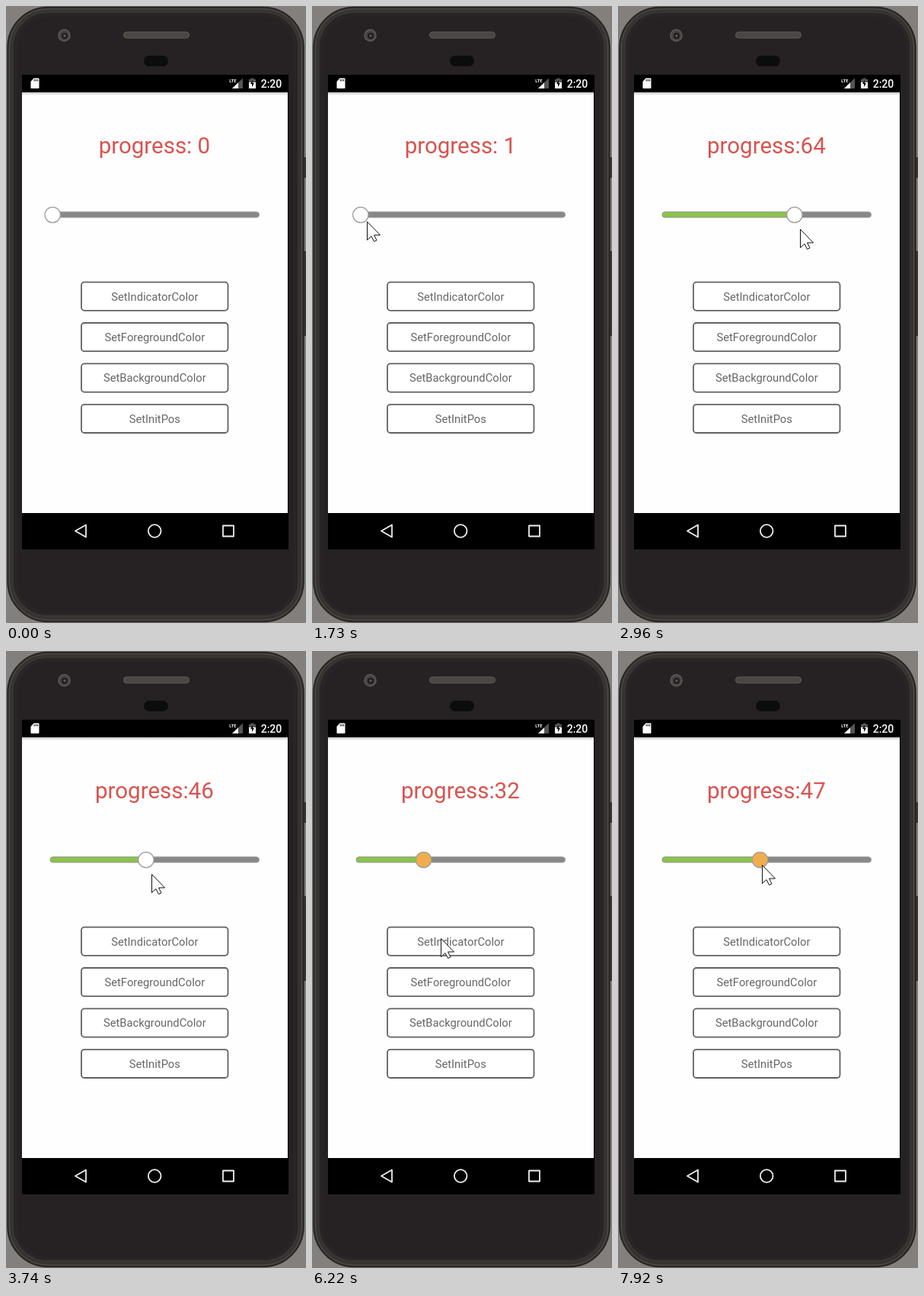
Write an HTML page that moves like this. It is 394 px wide and 808 px high and loops after 8 s.

```html
<!DOCTYPE html>
<html lang="en">
<head>
<meta charset="utf-8">
<title>Slider demo</title>
<style>
  html, body { margin: 0; width: 100%; height: 100%; overflow: hidden; background: #827f7d; }
  svg { display: block; font-family: Roboto, sans-serif; }
  .button rect { fill: #fff; stroke: #626262; stroke-width: 1.8; }
  .button text { fill: #666; font-size: 14.75px; text-anchor: middle; }
  .button.pressed rect { fill: #ddd; }
</style>
</head>
<body>
<svg width="394" height="808" viewBox="0 0 394 808">
  <defs>
    <linearGradient id="shadow" x2="0" y2="1">
      <stop stop-color="#c4c4c4"/>
      <stop offset="1" stop-color="#fefefe"/>
    </linearGradient>
  </defs>

  <!-- phone -->
  <path d="M391 198h3v27h-3zM391 321h3v111h-3z" fill="#3a3836"/>
  <rect x="2" y="1.5" width="389" height="805" rx="53" fill="#35322f" stroke="#252322" stroke-width="1.5"/>
  <rect x="4.500" y="4" width="384" height="800" rx="50" fill="none" stroke="#55514d"/>
  <rect x="8.500" y="8" width="376" height="791" rx="46" fill="#292526" stroke="#383533" stroke-width="2.500"/>
  <rect x="15" y="14" width="363" height="780" rx="40" fill="#262223"/>
  <circle cx="76.500" cy="38.500" r="7.500" fill="#454241" stroke="#5d5a58" stroke-width="1.500"/>
  <circle cx="77" cy="39" r="4" fill="#1f1c1d"/>
  <circle cx="77" cy="39" r="1.800" fill="#5a5757"/>
  <rect x="154.500" y="34" width="86" height="8" rx="4" fill="#494644" stroke="#5f5b58"/>
  <rect x="181" y="65" width="32" height="14" rx="7" fill="#0c0c0c"/>

  <!-- screen -->
  <rect x="21" y="90" width="350" height="621.5"/>
  <rect x="21" y="113" width="349" height="551" fill="#fefefe"/>
  <rect x="21" y="113" width="349" height="4" fill="url(#shadow)"/>
  <g fill="#fff">
    <path d="M36.500 94.500h6q1 0 1 1v11.500q0 1-1 1h-9q-1 0-1-1v-8z"/>
    <path d="M37.200 96v2.500M39.400 96v2.500M41.600 96v2.500" stroke="#000"/>
    <path d="M311 94.500V108h-14z" fill="#555"/>
    <path d="M305 100.300V108h-8z"/>
    <text x="293.300" y="100" font-size="5.600" font-weight="700">LTE</text>
    <path d="M321.500 94.500h4v1.500h2.500v5h-9v-5h2.500z" fill="#555"/>
    <path d="M319 100h9v8h-9z"/>
    <path d="M324 97l-3 5h2v4l3-5h-2z" fill="#000"/>
    <text x="334.700" y="107" font-size="14" font-weight="500">2:20</text>
  </g>
  <g fill="none" stroke="#eee" stroke-width="1.800" stroke-linejoin="round">
    <path d="M91 687.500l14-8v16z"/>
    <circle cx="195.200" cy="687.500" r="8.300"/>
    <rect x="285" y="680.500" width="14" height="14"/>
  </g>

  <text id="label" x="194.900" y="192.500" font-size="29.500" fill="#d9534f" text-anchor="middle"></text>
  <rect x="58" y="269.700" width="274.500" height="7.200" rx="3.600" fill="#888"/>
  <rect id="fill" x="58" y="269.700" height="7.200" rx="3.600" fill="#8bc34a"/>
  <rect x="58" y="269.700" width="274.500" height="7.200" rx="3.600" fill="none" stroke="#999"/>
  <circle id="thumb" cy="273.500" r="10.200" stroke="#a09c99" stroke-width="1.200"/>
  <g id="buttons"></g>
  <path id="cursor" d="M.5.5v24l5.500-5 3.500 7 3.500-1.700-3.500-6.800h8z" fill="#fff" stroke="#111"/>
</svg>
<script>
const LOOP = 8000, STEP = 77;
const $ = id => document.getElementById(id);

$("buttons").innerHTML = ["SetIndicatorColor", "SetForegroundColor", "SetBackgroundColor", "SetInitPos"]
  .map((name, i) => `<g class="button" transform="translate(0 ${i * 53.4})">
    <rect x="99" y="361.600" width="192.500" height="37.200" rx="4"/>
    <text x="195.300" y="385.700">${name}</text></g>`).join("");
const firstButton = $("buttons").firstElementChild;

// Each burst of motion advances in steps counted from its own start.
const bursts = [0, 400, 780, 1730, 2580, 3430, 4510, 6850, 7690];

const ramp = (t, from, to) => Math.min(1, Math.max(0, (t - from) / (to - from)));
const ease = (t, from, to) => (1 - Math.cos(Math.PI * ramp(t, from, to))) / 2;

// Two drags: up and partly back, then a little down and up again.
const progressAt = t => Math.round(
  66.7 * ease(t, 1640, 3150) - 34.7 * ease(t, 3150, 4200)
  - 6 * ease(t, 7081, 7440) + 21 * ease(t, 7440, 7921));

// Cursor glides: from, to, x offset from the thumb, y.
const glides = [
  [400, 631, 120, 404], [703, 1011, 30, 286], [1011, 1320, 8, 282],
  [2192, 2965, 7.5, 292], [4433, 4741, 19.5, 376], [6150, 6200, 22.5, 376], [6773, 7081, 2, 280]
];

function cursorAt(t) {
  let dx = 204, y = 683;
  for (const [from, to, nextDx, nextY] of glides) {
    const k = ramp(t, from, to);
    dx += (nextDx - dx) * k;
    y += (nextY - y) * k;
  }
  return [dx, y];
}

function draw(t) {
  const start = bursts.filter(b => b <= t).pop();
  const stepped = start + Math.floor((t - start + 5) / STEP) * STEP;
  const progress = progressAt(stepped), thumbX = 61.2 + 2.667 * progress;
  const [dx, y] = cursorAt(stepped);
  $("label").textContent = "progress:" + String(progress).padStart(2, "\u00a0");
  $("fill").setAttribute("width", thumbX - 58);
  $("thumb").setAttribute("cx", thumbX);
  $("thumb").setAttribute("fill", t < 5670 ? "#fff" : "#f0ad4e");
  firstButton.classList.toggle("pressed", t >= 5520 && t < 5670);
  $("cursor").setAttribute("transform", `translate(${Math.round(thumbX + dx)} ${Math.round(y)})`);
  $("cursor").setAttribute("visibility", t < 400 ? "hidden" : "visible");
}

const origin = performance.now();
function tick() {
  draw((performance.now() - origin) % LOOP);
  requestAnimationFrame(tick);
}
tick();
</script>
</body>
</html>
```
